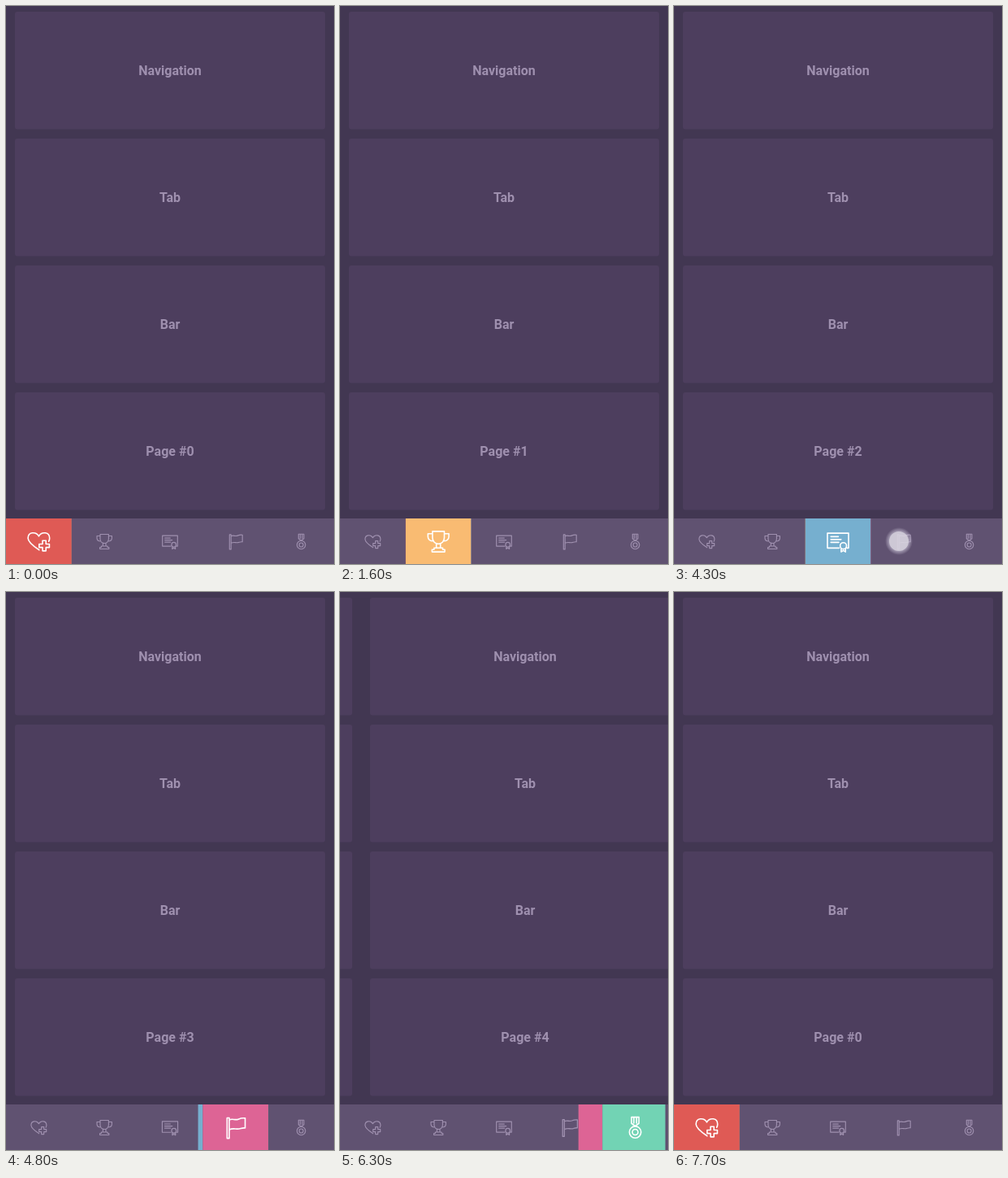
Recreate the animation shown at these times as an HTML page. Size 404 by 686 pixels, loop 8 s.

```html
<!DOCTYPE html>
<html lang="en">
<head>
<meta charset="utf-8">
<title>Navigation tab bar</title>
<style>
  html, body { margin: 0; width: 100%; height: 100%; overflow: hidden; background: #423752; }
  svg { display: block; width: 404px; height: 686px; }
  text { font: 700 16px Roboto, sans-serif; fill: #9f90af; text-anchor: middle; }
  .icons { fill: none; stroke-width: 1.15; stroke-linejoin: round; stroke-linecap: round; }
</style>
</head>
<body>
<svg id="stage" viewBox="0 0 404 686">
  <defs>
    <clipPath id="pointer"><rect id="pointerRect" y="630" height="56"/></clipPath>
    <radialGradient id="glow">
      <stop offset=".68" stop-color="#d8d2e4" stop-opacity=".6"/>
      <stop offset="1" stop-color="#d8d2e4" stop-opacity="0"/>
    </radialGradient>
  </defs>
  <rect width="404" height="686" fill="#423752"/>
  <g id="pages"></g>
  <rect y="630" width="404" height="56" fill="#605271"/>
  <g id="idle" class="icons" stroke="#9f90af"></g>
  <g clip-path="url(#pointer)">
    <g id="cells"></g>
    <g id="active" class="icons" stroke="#fff"></g>
  </g>
  <g id="touch">
    <circle r="17" fill="url(#glow)"/>
    <circle r="12" fill="#d9d5df" fill-opacity=".75"/>
  </g>
</svg>
<script>
const WIDTH = 404, TAB = WIDTH / 5, LOOP = 8000, DURATION = 300, TAB_LAG = 12;
const COLORS = ['#df5a55', '#f9bb72', '#76afcf', '#dd6495', '#72d3b4'];
const ICONS = [
  // heart with plus
  'M.3 7.3C-4 4.5-9.5.6-9.5-3C-9.5-8.6-2.6-9.2 0-4.8C2.6-9.2 9.5-8.6 9.5-3Q9.5-1.5 8.7-.2' +
  'M3.3-.9h3v3h3v3h-3v3h-3v-3h-3v-3h3z',
  // trophy
  'M-5.2-9h10.4v5.5c0 3.5-2.5 5.5-5.2 5.5s-5.2-2-5.2-5.5z' +
  'M-5.2-7h-4v2.5c0 2.5 2 4 4.6 4M5.2-7h4v2.5c0 2.5-2 4-4.6 4' +
  'M-1.8 2v3.5M1.8 2v3.5M-3.8 5.5h7.6v1.5h1.8v2h-11.2v-2h1.8z',
  // certificate
  'M1 5.6h-10.3v-13h18.6v13h-1.5M-6.3-4.4h6.6M-6.3-1.9h9M-6.3.6h7' +
  'M1.9 3.7a2.8 2.8 0 1 0 5.6 0a2.8 2.8 0 1 0-5.6 0M2.8 6v3l1.9-1.2l1.9 1.2v-3',
  // flag
  'M-7.5-8.6h1.9v18h-1.9zM-5.6-6.8c3-1.6 5 .7 8-.6s4-1.2 6-.9v8.6c-3-.4-4 .9-6.6.9s-4.4-.8-7.4.6',
  // medal
  'M-3.3-9.3h6.6v5.5l-3.3 2.5l-3.3-2.5zM-1.2-9v5M1.2-9v5' +
  'M-5.2 4a5.2 5.2 0 1 0 10.4 0a5.2 5.2 0 1 0-10.4 0M-2.5 4a2.5 2.5 0 1 0 5 0a2.5 2.5 0 1 0-5 0'
];
// down: finger appears, go: transition starts
const TAPS = [
  { down: 1100, go: 1218, x: 117, y: 658, to: 1 },
  { down: 2800, go: 2917, x: 198, y: 658, to: 2 },
  { down: 4300, go: 4500, x: 277, y: 658, to: 3 },
  { down: 5900, go: 6050, x: 359, y: 659, to: 4 },
  { down: 7200, go: 7350, x: 27, y: 657, to: 0 }
];

const $ = id => document.getElementById(id);
const clamp = v => Math.min(1, Math.max(0, v));
const mix = (a, b, k) => a + (b - a) * k;

function add(parent, name, attrs, text) {
  const el = document.createElementNS('http://www.w3.org/2000/svg', name);
  for (const key in attrs) el.setAttribute(key, attrs[key]);
  if (text) el.textContent = text;
  return parent.appendChild(el);
}

COLORS.forEach((fill, i) => {
  const page = add($('pages'), 'g', { transform: `translate(${i * WIDTH} 0)` });
  ['Navigation', 'Tab', 'Bar', 'Page #' + i].forEach((label, row) => {
    const y = 7 + row * 156;
    add(page, 'rect', { x: 11, y, width: 382, height: 144.5, rx: 3, fill: '#4d3e5e' });
    add(page, 'text', { x: 202, y: y + 78 }, label);
  });
  add($('cells'), 'rect', { x: i * TAB, y: 630, width: TAB, height: 56, fill });
});
const icons = ICONS.map(d => ['idle', 'active'].map(id => add($(id), 'path', { d })));

function render(time) {
  const done = TAPS.filter(tap => time >= tap.go).length;
  const to = done ? TAPS[done - 1].to : 0;
  const from = done > 1 ? TAPS[done - 2].to : 0;
  const elapsed = done ? time - TAPS[done - 1].go : DURATION * 2;

  const scroll = 0.5 - Math.cos(Math.PI * clamp(elapsed / DURATION)) / 2;
  $('pages').setAttribute('transform', `translate(${-Math.round(mix(from, to, scroll) * WIDTH)} 0)`);

  // The leading edge eases out while the trailing edge eases in.
  const f = clamp((elapsed - TAB_LAG) / DURATION);
  const lead = 1 - (1 - f) ** 2, trail = f ** 2;
  const forward = to >= from;
  const left = mix(from, to, forward ? trail : lead) * TAB;
  const right = (mix(from, to, forward ? lead : trail) + 1) * TAB;
  $('pointerRect').setAttribute('x', left);
  $('pointerRect').setAttribute('width', right - left);

  icons.forEach((pair, i) => {
    const grow = i === to ? (from === to ? 1 : lead) : i === from ? 1 - trail : 0;
    const transform = `translate(${(i + 0.5) * TAB} 658.5) scale(${1 + 0.4 * grow})`;
    pair.forEach(el => el.setAttribute('transform', transform));
  });

  const tap = TAPS.find(p => time >= p.down && time < p.go + 80);
  $('touch').setAttribute('opacity', tap ? 1 - clamp((time - tap.go) / 80) : 0);
  if (tap) $('touch').setAttribute('transform', `translate(${tap.x} ${tap.y})`);
}

const start = performance.now();
function tick() {
  render((performance.now() - start) % LOOP);
  requestAnimationFrame(tick);
}
tick();
</script>
</body>
</html>
```
